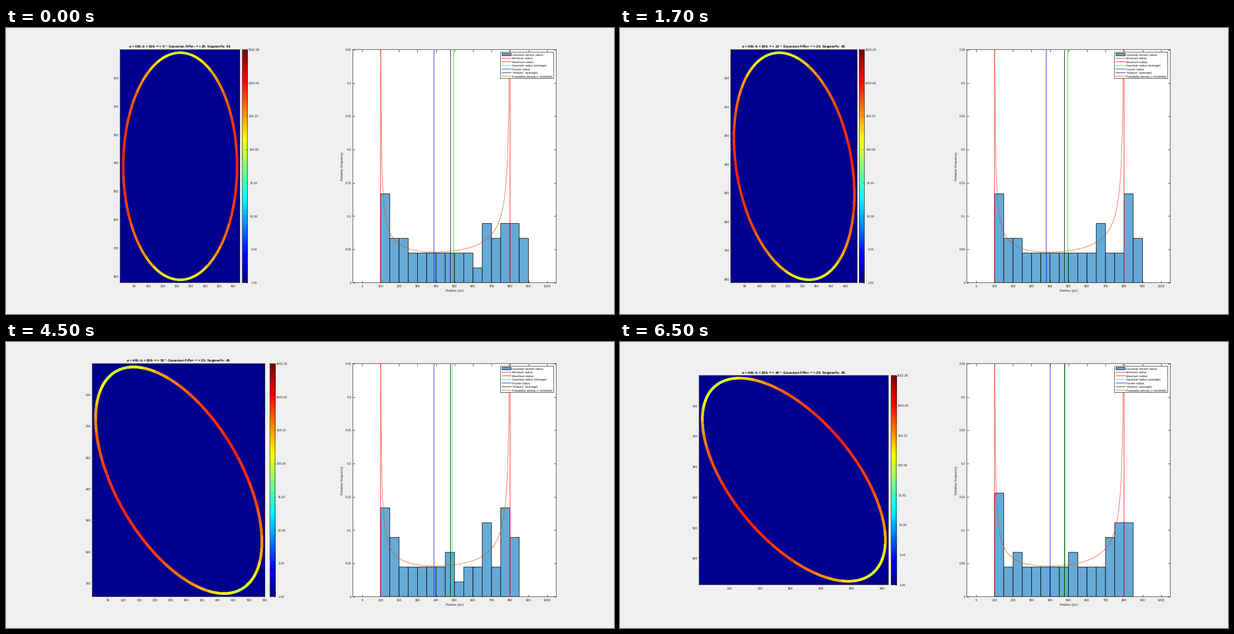
These frames come from a looping animation (1091 px wide and 513 px high, 8000 ms). A matplotlib script:

```python
import numpy as np
import matplotlib.pyplot as plt
from matplotlib.animation import FuncAnimation
from matplotlib.colors import ListedColormap
from matplotlib.patches import Rectangle

W, H, DPI = 1091, 513, 64
PX = 72 / DPI                      # points per pixel
A, B, SEGMENTS = 400, 200, 45
INK = "#262626"
FILL, RED, GREEN, BLUE, ORANGE = "#66aad7", "#ff0000", "#00ff00", "#0000ff", "#d95319"

plt.rcParams.update({
    "font.family": "Liberation Sans",
    "mathtext.fontset": "stix",
    "text.hinting": "none",
    "path.snap": False,
})

# tilt, image left/right/top/bottom, colour bar left, Gaussian and Fourier radius, counts
STATES = [
    (0, 204.8, 419.1, 38.8, 456.8, 424, 496, 389,
     [6, 3, 3, 2, 2, 2, 2, 2, 2, 2, 1, 4, 3, 4, 4, 3]),
    (10, 198.7, 424.7, 38.8, 456.8, 429.3, 496, 380,
     [6, 3, 3, 2, 2, 2, 2, 2, 2, 2, 2, 4, 2, 2, 6, 3]),
    (20, 182.4, 441.2, 38.8, 456.8, 446, 490, 380,
     [7, 2, 3, 3, 1, 2, 1, 3, 1, 4, 2, 2, 5, 3, 4, 2]),
    (30, 154.8, 464.6, 38.8, 456.8, 473.7, 487, 389,
     [6, 4, 2, 2, 2, 2, 2, 3, 1, 2, 2, 5, 2, 6, 4, 0]),
    (40, 142, 481.5, 60, 435.5, 486.5, 482, 401,
     [7, 2, 3, 2, 2, 2, 2, 2, 3, 2, 2, 2, 4, 5, 5, 0]),
]


def jet64():
    i = np.arange(1, 65)
    ramp = lambda k: np.clip(np.minimum(k, 48 - k) / 16, 0, 1)
    return ListedColormap(np.column_stack([ramp(i - 24), ramp(i - 8), ramp(i + 8)]))


def speed2(t):
    return (A * np.sin(t)) ** 2 + (B * np.cos(t)) ** 2


def radius(t):
    return speed2(t) ** 1.5 / (A * B)


T = np.linspace(-np.pi, np.pi, 4001)
MID = (T[1:] + T[:-1]) / 2
ARC = np.concatenate([[0], np.cumsum(np.sqrt(speed2(MID)) * (T[1] - T[0]))])
PERIMETER = ARC[-1]
SEG_T = np.interp((np.arange(SEGMENTS) + 0.5) / SEGMENTS * PERIMETER, ARC, T)
SEG_LOG = np.log10(radius(SEG_T))


def ring(tilt):
    """Log radius of curvature on a thick ellipse outline, zero elsewhere."""
    s, c = np.sin(np.radians(tilt)), np.cos(np.radians(tilt))
    w = round(2 * np.hypot(A * s, B * c) + 21)
    h = round(2 * np.hypot(A * c, B * s) + 21)
    y, x = np.mgrid[1:h + 1, 1:w + 1].astype(float)
    x -= (w + 1) / 2
    y -= (h + 1) / 2
    u, v = x * s + y * c, x * c - y * s
    grad = 2 * np.hypot(u / A**2, v / B**2) + 1e-9
    dist = np.abs((u / A) ** 2 + (v / B) ** 2 - 1) / grad
    pos = np.interp(np.arctan2(v / B, u / A), T, ARC) / PERIMETER
    seg = np.minimum((pos * SEGMENTS).astype(int), SEGMENTS - 1)
    return np.where(dist < 4.5, SEG_LOG[seg], 0)


def box(left, right, top, bottom):
    return [left / W, 1 - bottom / H, (right - left) / W, (bottom - top) / H]


def style(ax, length=4.2):
    ax.tick_params(direction="in", top=True, right=True, length=length * PX,
                   width=0.8 * PX, color=INK, labelcolor=INK, labelsize=5.8 * PX)
    ax.tick_params(axis="x", pad=3.6 * PX)
    ax.tick_params(axis="y", pad=2.4 * PX)
    for spine in ax.spines.values():
        spine.set(color=INK, linewidth=0.8 * PX)


fig = plt.figure(figsize=(W / DPI, H / DPI), dpi=DPI, facecolor="#f0f0f0")
img_ax = fig.add_axes(box(*STATES[0][1:5]))
bar_ax = fig.add_axes(box(424, 433, 38.8, 456.8))
hist_ax = fig.add_axes(box(622.3, 987.3, 38.8, 456.8))
page = fig.add_axes([0, 0, 1, 1], zorder=5)
page.set(xlim=(0, W), ylim=(H, 0))
page.axis("off")


def label(x, y, text, size=5.8, color=INK, ha="center", va="center_baseline", **kw):
    return page.text(x, y, text, fontsize=size * PX, color=color, ha=ha, va=va, **kw)


# Ellipse image and colour bar
cmap = jet64()
rings = [ring(state[0]) for state in STATES]
image = img_ax.imshow(rings[0], cmap=cmap, vmin=0, vmax=3.5, aspect="auto",
                      interpolation="hanning", interpolation_stage="rgba")
style(img_ax)
title = label(312, 35.3, "", 6.3, "black", va="baseline", weight="bold")

bar_ax.imshow(np.arange(64)[:, None], cmap=cmap, origin="lower", aspect="auto",
              interpolation="nearest", extent=(0, 1, 0, 3.5))
levels = np.arange(8) / 2
bar_ax.set_xticks([])
bar_ax.set_yticks(levels, [""] * 8)
style(bar_ax, 2.5)
bar_ax.tick_params(left=False)
level_labels = [label(0, 0, f"{10 ** v:.2f}", 5.6) for v in levels]

# Histogram
style(hist_ax)
hist_ax.set(xlim=(-50, 1050), ylim=(0, 0.35))
hist_ax.set_xticks(range(0, 1001, 100))
yticks = np.arange(8) * 0.05
hist_ax.set_yticks(yticks, [f"{v:g}" for v in yticks])
label(804.8, 471, "Radius (px)", 6.3)
label(603.5, 248, "Relative frequency", 6.3, va="center", rotation=90)

bars = hist_ax.bar(np.arange(100, 900, 50), np.zeros(16), 50, align="edge",
                   facecolor=FILL, edgecolor="black", linewidth=0.85 * PX)


def vline(x, color):
    return hist_ax.axvline(x, color=color, linewidth=0.85 * PX)


vline(B**2 / A, RED)
vline(A**2 / B, RED)
gauss_line = vline(0, GREEN)
fourier_line = vline(0, BLUE)
mean_radius = np.average(radius(MID), weights=np.sqrt(speed2(MID)))
vline(mean_radius, "black")

t = np.linspace(0.002, np.pi / 2 - 0.002, 1500)
slope = 1.5 * np.sqrt(speed2(t)) * (A**2 - B**2) * np.sin(2 * t) / (A * B)
density = 4 * np.sqrt(speed2(t)) / PERIMETER / slope
hist_ax.plot(radius(t), density * 50, color=ORANGE, linewidth=0.75 * PX)

# Legend
page.add_patch(Rectangle((887.3, 43.3), 95.5, 47.2, facecolor="white",
                         edgecolor=INK, linewidth=0.8 * PX))
page.add_patch(Rectangle((890.3, 45.6), 16, 4.2, facecolor=FILL,
                         edgecolor="black", linewidth=0.85 * PX))
entries = [
    ("Gaussian section radius", None),
    ("Minimum radius", RED),
    ("Maximum radius", RED),
    ("Gaussian radius (average)", GREEN),
    ("Fourier radius", BLUE),
    ("\"Analytic\" (average)", "black"),
    ("Probability density (× binWidth)", ORANGE),
]
for row, (text, color) in enumerate(entries):
    y = 47.8 + 6.47 * row
    label(908, y + 1.9, text, 5.25, "black", ha="left", va="baseline")
    if color:
        page.plot([890, 906.5], [y, y], color=color, linewidth=0.8 * PX)


def update(i):
    k = (i + 3) // 4
    tilt, left, right, top, bottom, bar_left, gauss, fourier, counts = STATES[k]
    h, w = rings[k].shape
    img_ax.set_position(box(left, right, top, bottom))
    image.set_data(rings[k])
    image.set_extent((0.5, w + 0.5, h + 0.5, 0.5))
    img_ax.set(xlim=(0.5, w + 0.5), ylim=(h + 0.5, 0.5))
    img_ax.set_xticks(range(100, w, 100) if tilt == 40 else range(50, w + 1, 50))
    img_ax.set_yticks(range(100, h, 100))
    title.set_text(rf"a = 400, b = 200, $\boldsymbol{{\alpha}}$ = {tilt} °. Gaussian Filter: "
                   rf"$\boldsymbol{{\sigma}}$ = 25. Segments: 45")
    title.set_position(((left + right) / 2, top - 3.6))

    bar_ax.set_position(box(bar_left, bar_left + 9.1, top, bottom))
    for v, text in zip(levels, level_labels):
        text.set_position((bar_left + 20.8, bottom - (bottom - top) * v / 3.5))

    for bar, n in zip(bars, counts):
        bar.set_height(n / SEGMENTS)
        bar.set_visible(n > 0)
    gauss_line.set_xdata([gauss, gauss])
    fourier_line.set_xdata([fourier, fourier])
    return []


anim = FuncAnimation(fig, update, frames=16, interval=500, repeat=True)
plt.show()
```
